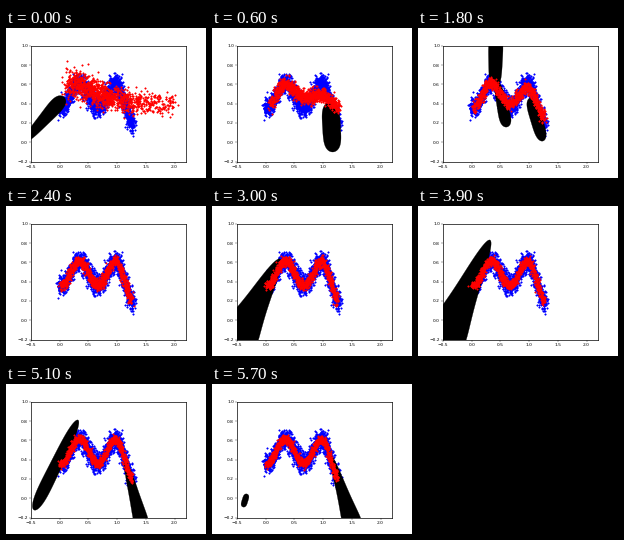
Animation of 200 by 150 pixels, one loop 6 s. Source, as a matplotlib script:

```python
import numpy as np
import matplotlib.pyplot as plt
from matplotlib.animation import FuncAnimation
from matplotlib.patches import Polygon

FRAMES, INTERVAL = 20, 300
N_DATA, N_FIT = 2200, 1200
FADE = 2            # frames a region takes to grow or vanish
PEAK, PERIOD = 0.34, 0.64

plt.rcParams["axes.linewidth"] = 1.6
fig, ax = plt.subplots(figsize=(6.4, 4.8), dpi=31.25)
ax.set_xlim(-0.5, 2.2)
ax.set_ylim(-0.2, 1.0)
ax.set_xticks(np.arange(-0.5, 2.1, 0.5))


def wave(x):
    """The M-shaped curve: two humps and a steeper right end."""
    hump = 0.49 + 0.13 * np.cos(2 * np.pi * (x - PEAK) / PERIOD)
    return hump - 0.67 * np.maximum(0, x - PEAK - PERIOD)


def fit(u, i):
    """Fitted curve: a flat smear that settles into the M."""
    start = 0.13 * np.exp(-i / 5)
    x = start + (1.25 - start) * u + 0.75 * u**6 * np.exp(-2 * i)
    flat = 0.6 - 0.2 * np.tanh(1.5 * np.maximum(0, x - PEAK))
    k = min(1, i / 8)
    k = np.where(x < PEAK, min(1, 4 * k), k)
    return np.column_stack([x, (1 - k) * flat + k * wave(x)])


def tapered(x0, y0, x1, y1, w0, w1):
    """Outline of a round-ended stroke, in stage pixels to axis units."""
    s = (1 - np.cos(np.linspace(0, np.pi, 40))) / 2
    w = w0 * (w1 / w0) ** s * np.sqrt(1 - (2 * s - 1) ** 4)
    dx, dy = x1 - x0, y1 - y0
    length = np.hypot(dx, dy)
    cx, cy = x0 + dx * s, y0 + dy * s
    nx, ny = -dy / length * w, dx / length * w
    x = np.concatenate([cx + nx, (cx - nx)[::-1]])
    y = np.concatenate([cy + ny, (cy - ny)[::-1]])
    return np.column_stack([(x - 25) / 57.4 - 0.5, (133.5 - y) / 96.25 - 0.2])


def stroke_at(keys, i):
    """Stroke between its key poses, and its size from 0 to 1."""
    times = sorted(keys)
    pose = [np.interp(i, times, col) for col in zip(*(keys[t] for t in times))]
    gap = max(times[0] - i, i - times[-1], 0)
    return pose, 1 - gap / FADE


# Dark regions: key frame -> x0, y0, x1, y1, start and end half-width
regions = [
    {0: (18, 114, 58, 69, 4, 9)},
    {2: (118, 74, 121, 124, 9, 9), 6: (112, 70, 125, 113, 6, 6)},
    {6: (78, 6, 77, 60, 8, 6)},
    {6: (79, 54, 89, 99, 4, 7)},
    {10: (16, 150, 68, 53, 30, 6), 13: (18, 152, 72, 34, 30, 6),
     17: (28, 126, 72, 36, 7, 5), 19: (31, 123, 35, 110, 3, 3)},
    {17: (119, 76, 139, 152, 3, 10), 19: (119, 72, 145, 154, 3, 14)},
]

rng = np.random.default_rng(4)
x = rng.uniform(-0.02, 1.28, N_DATA)
data_x = x + rng.normal(0, 0.033, N_DATA)
data_y = wave(x) + rng.normal(0, 0.047, N_DATA)

ax.plot(data_x, data_y, "b.", ms=7, zorder=2)
patches = [ax.add_patch(Polygon(np.zeros((3, 2)), color="black", lw=0.6, zorder=3))
           for _ in regions]
red, = ax.plot([], [], "r.", ms=7, zorder=4)


def update(i):
    for patch, keys in zip(patches, regions):
        pose, size = stroke_at(keys, i)
        outline = tapered(*pose)
        middle = outline.mean(axis=0)
        patch.set_xy(middle + max(size, 0) * (outline - middle))
        patch.set_visible(size > 0)
    r = np.random.default_rng(100 + i)
    u = r.random(N_FIT)
    sigma = 0.018 + 0.018 * np.exp(-i / 8) + 0.04 * np.exp(-2 * i) * (1 - 0.5 * u)
    points = fit(u, i) + sigma[:, None] * r.normal(0, 1, (N_FIT, 2))
    red.set_data(points[:, 0], points[:, 1])
    return [*patches, red]


anim = FuncAnimation(fig, update, frames=FRAMES, interval=INTERVAL,
                     repeat=True, repeat_delay=0, blit=False)
plt.show()
```
